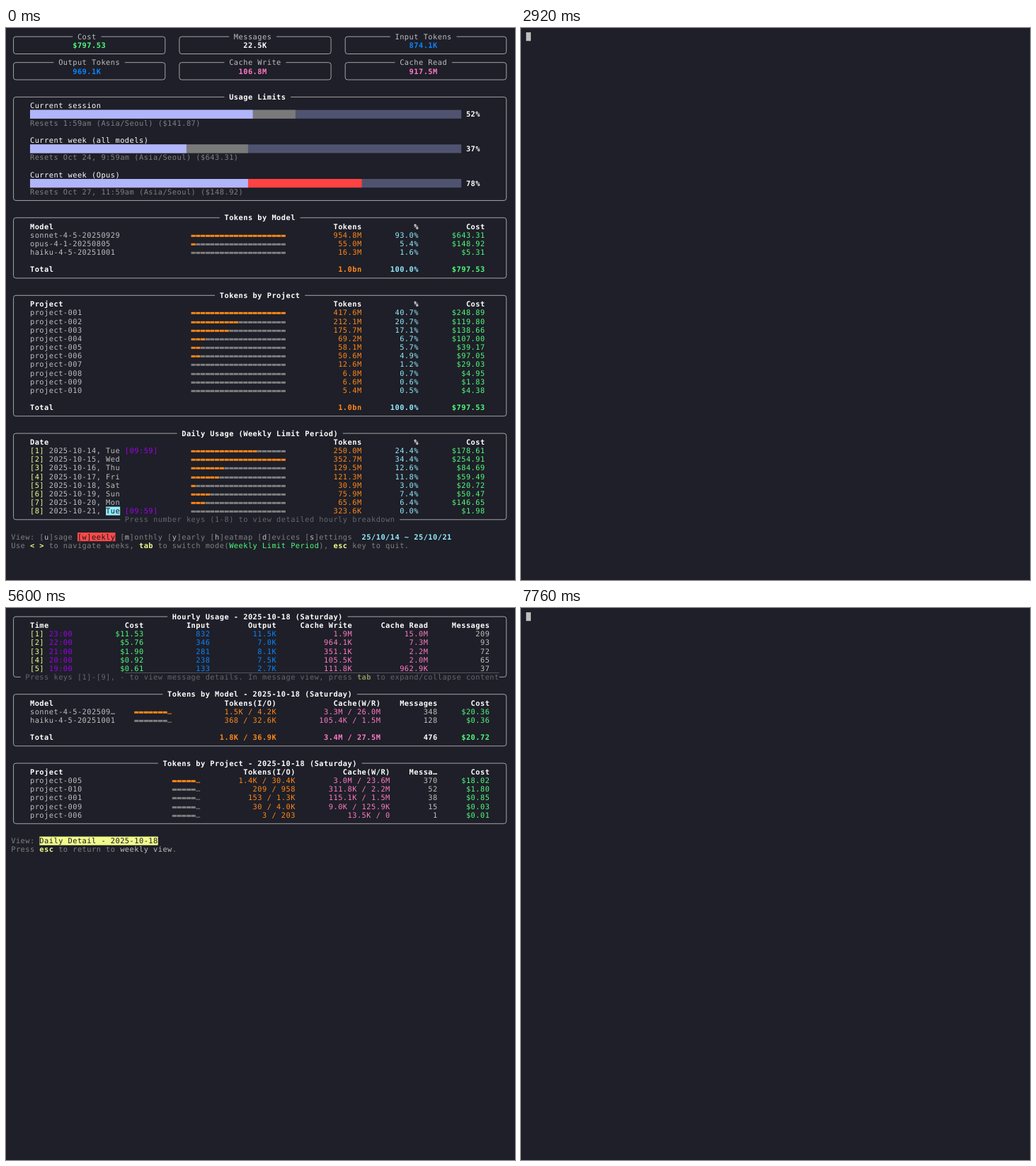
Write an HTML page that moves like this. It is 719 px wide and 779 px high and loops after 8 s.

```html
<!DOCTYPE html>
<html lang="en">
<head>
<meta charset="utf-8">
<title>Usage monitor</title>
<style>
html, body { margin: 0; width: 100%; height: 100%; overflow: hidden; background: #1e1f28; }
svg { display: block; width: 719px; height: 779px; }
text {
  font: 17px "DejaVu Sans Mono", monospace;
  letter-spacing: .765px; /* widens the glyph advance to an 11px cell */
  white-space: pre;
  text-rendering: geometricPrecision;
  fill: #bfbfbf;
}
.b { font-weight: bold; }
.white { fill: #fff; }
.grey { fill: #808080; }
.dim { fill: #66666c; }
.olive { fill: #8b915c; }
.green { fill: #50fb7c; }
.blue { fill: #0a84ff; }
.pink { fill: #ff79c6; }
.orange { fill: #ff8719; }
.cyan { fill: #93ebfe; }
.yellow { fill: #f0fb8c; }
.purple { fill: #9d00ec; }
.ink { fill: #15161c; }
.red { fill: #fc4a4a; }
.alert { fill: #ff4242; }
.used { fill: #b1b5fa; }
.pace { fill: #7a7a7a; }
.rest { fill: #505370; }
.frame { fill: none; stroke: #b2b2b4; stroke-width: 1.5; }
.trace { fill: none; stroke: #7a7a80; stroke-width: 1; }
#cursor { fill: #bfbfbf; animation: cursor 8s step-end infinite; }
#week { animation: week 8s step-end infinite; }
#detail { animation: detail 8s step-end infinite; }
@keyframes week { 0% { opacity: 1; } 36.5%, 100% { opacity: 0; } }
@keyframes detail { 0% { opacity: 0; } 37.5% { opacity: 1; } 97%, 100% { opacity: 0; } }
/* blinks under each view, jumps to the top when the screen clears */
@keyframes cursor {
  0%, 8%, 19%, 30% { opacity: 0; transform: translateY(1200px); }
  2.5%, 13.5%, 24.5%, 35.5% { opacity: 1; transform: translateY(1200px); }
  36.5%, 97%, 100% { opacity: 1; transform: translateY(0); }
  38%, 50.5%, 63.5%, 76.5%, 89.5% { opacity: 1; transform: translateY(560px); }
  44%, 57%, 70%, 83%, 96% { opacity: 0; transform: translateY(560px); }
}
</style>
</head>
<body>
<svg viewBox="0 0 719 779">
  <g transform="translate(7.2 6.09) scale(.6086)">
    <g id="week"></g>
    <g id="detail"></g>
    <rect id="cursor" width="11" height="20"/>
  </g>
</svg>
<script>
const W = 11, H = 20;
let view;

function add(tag, attrs, parent = view) {
  const el = document.createElementNS("http://www.w3.org/2000/svg", tag);
  for (const key in attrs) el.setAttribute(key, attrs[key]);
  return parent.appendChild(el);
}

// Writes [text, class] runs one after another from a grid cell.
function write(col, row, ...runs) {
  const line = add("text", { x: col * W, y: row * H + 16 });
  for (const [text, cls = ""] of runs)
    add("tspan", { class: cls }, line).textContent = text;
}

const writeEnd = (end, row, text, cls) => write(end - text.length, row, [text, cls]);

const fill = (col, row, cells, cls) =>
  add("rect", { x: col * W, y: row * H, width: cells * W, height: H, class: cls });

// Rounded frame with a centred title and an optional gap in the bottom line.
function box(left, top, right, bottom, title, cls, gap) {
  const space = title.length + 2;
  const start = left + 1 + Math.floor((right - left - 1 - space) / 2);
  const x0 = left * W + 5.5, x1 = right * W + 5.5;
  const y0 = top * H + 10, y1 = bottom * H + 10, r = 5.5;
  const low = gap ? `H${gap[1] * W}M${gap[0] * W} ${y1}` : "";
  add("path", {
    class: "frame",
    d: `M${start * W} ${y0}H${x0 + r}Q${x0} ${y0} ${x0} ${y0 + r}V${y1 - r}` +
       `M${(start + space) * W} ${y0}H${x1 - r}Q${x1} ${y0} ${x1} ${y0 + r}V${y1 - r}` +
       `Q${x1} ${y1} ${x1 - r} ${y1}${low}H${x0 + r}Q${x0} ${y1} ${x0} ${y1 - r}`
  });
  write(start + 1, top, [title, cls]);
}

// One "|" separated row of right-aligned cells.
function cells(row, ends, text, classes, bold = "") {
  text.split("|").forEach((cell, i) =>
    cell && writeEnd(ends[i], row, cell, `${classes[i]} ${bold}`));
}

function header(row, name, ends, text) {
  write(4, row, [name, "white b"]);
  cells(row, ends, text, ends.map(() => "white"), "b");
}

const meter = (row, on) =>
  write(38, row, ["▬".repeat(on), "orange"], ["▬".repeat(20 - on), "grey"]);

// Weekly view
view = document.getElementById("week");

[
  [0, 0, 32, "Cost", "$797.53", "green"],
  [35, 0, 67, "Messages", "22.5K", "white"],
  [70, 0, 104, "Input Tokens", "874.1K", "blue"],
  [0, 3, 32, "Output Tokens", "969.1K", "blue"],
  [35, 3, 67, "Cache Write", "106.8M", "pink"],
  [70, 3, 104, "Cache Read", "917.5M", "pink"]
].forEach(([left, top, right, title, value, cls]) => {
  box(left, top, right, top + 2, title);
  const pad = Math.floor((right - left - 1 - value.length) / 2);
  write(left + 1 + pad, top + 1, [value, cls + " b"]);
});

box(0, 7, 104, 19, "Usage Limits", "white b");
[
  ["Current session", "Resets 1:59am (Asia/Seoul) ($141.87)", 51, 60, "pace", "52%"],
  ["Current week (all models)", "Resets Oct 24, 9:59am (Asia/Seoul) ($643.31)", 37, 50, "pace", "37%"],
  ["Current week (Opus)", "Resets Oct 27, 11:59am (Asia/Seoul) ($148.92)", 50, 74, "alert", "78%"]
].forEach(([name, reset, a, b, cls, percent], i) => {
  const row = 8 + i * 4;
  write(4, row, [name, "white"]);
  fill(4, row + 1, 91, "rest");
  fill(4, row + 1, b - 4, cls);
  fill(4, row + 1, a - 4, "used");
  write(96, row + 1, [percent, "white b"]);
  write(4, row + 2, [reset, "grey"]);
});

const ENDS = [74, 86, 100];
const TINTS = ["orange", "cyan", "green"];
const HEADS = "Tokens|%|Cost";

function usage(row, label, on, text) {
  write(4, row, ...label);
  meter(row, on);
  cells(row, ENDS, text, TINTS);
}

function total(row) {
  write(4, row, ["Total", "white b"]);
  cells(row, ENDS, "1.0bn|100.0%|$797.53", TINTS, "b");
}

box(0, 21, 104, 28, "Tokens by Model", "white b");
header(22, "Model", ENDS, HEADS);
usage(23, [["sonnet-4-5-20250929"]], 20, "954.8M|93.0%|$643.31");
usage(24, [["opus-4-1-20250805"]], 1, "55.0M|5.4%|$148.92");
usage(25, [["haiku-4-5-20251001"]], 0, "16.3M|1.6%|$5.31");
total(27);

box(0, 30, 104, 44, "Tokens by Project", "white b");
header(31, "Project", ENDS, HEADS);
[
  [20, "417.6M|40.7%|$248.89"],
  [10, "212.1M|20.7%|$119.80"],
  [8, "175.7M|17.1%|$138.66"],
  [3, "69.2M|6.7%|$107.00"],
  [2, "58.1M|5.7%|$39.17"],
  [2, "50.6M|4.9%|$97.05"],
  [0, "12.6M|1.2%|$29.03"],
  [0, "6.8M|0.7%|$4.95"],
  [0, "6.6M|0.6%|$1.83"],
  [0, "5.4M|0.5%|$4.38"]
].forEach(([on, text], i) =>
  usage(32 + i, [["project-" + String(i + 1).padStart(3, "0")]], on, text));
total(43);

box(0, 46, 104, 56, "Daily Usage (Weekly Limit Period)", "white b", [23, 82]);
header(47, "Date", ENDS, HEADS);
fill(20, 55, 3, "cyan");
[
  ["Tue", 14, "250.0M|24.4%|$178.61"],
  ["Wed", 20, "352.7M|34.4%|$254.91"],
  ["Thu", 7, "129.5M|12.6%|$84.69"],
  ["Fri", 6, "121.3M|11.8%|$59.49"],
  ["Sat", 1, "30.9M|3.0%|$20.72"],
  ["Sun", 4, "75.9M|7.4%|$50.47"],
  ["Mon", 3, "65.6M|6.4%|$146.65"],
  ["Tue", 0, "323.6K|0.0%|$1.98"]
].forEach(([day, on, text], i) => {
  const label = [[`[${i + 1}]`, "yellow"], [` 2025-10-${14 + i}, `], [day, i === 7 ? "ink" : ""]];
  if (day === "Tue") label.push([" [09:59]", "purple"]);
  usage(48 + i, label, on, text);
});
write(24, 56, ["Press number keys (1-8) to view detailed hourly breakdown", "dim"]);

const key = (letter, rest) => [["[", "grey"], [letter], [`]${rest} `, "grey"]];
fill(14, 58, 8, "red");
write(0, 58, ["View: ", "grey"], ...key("u", "sage"), ["[w]eekly", "ink"], [" "],
  ...key("m", "onthly"), ...key("y", "early"), ...key("h", "eatmap"),
  ...key("d", "evices"), ...key("s", "ettings"), [" "],
  ["25/10/14 ~ 25/10/21", "cyan b"]);
write(0, 59, ["Use ", "grey"], ["< >", "yellow b"], [" to navigate weeks, ", "grey"],
  ["tab", "yellow b"], [" to switch mode(", "grey"], ["Weekly Limit Period", "green"],
  ["), ", "grey"], ["esc", "yellow b"], [" key to quit.", "grey"]);

// Daily detail view
view = document.getElementById("detail");
const DAY = " - 2025-10-18 (Saturday)";

box(0, 0, 104, 7, "Hourly Usage" + DAY, "white b", [2, 103]);
const hourEnds = [28, 42, 56, 72, 88, 101];
header(1, "Time", hourEnds, "Cost|Input|Output|Cache Write|Cache Read|Messages");
[
  "$11.53|832|11.5K|1.9M|15.0M|209",
  "$5.76|346|7.0K|964.1K|7.3M|93",
  "$1.90|281|8.1K|351.1K|2.2M|72",
  "$0.92|238|7.5K|105.5K|2.0M|65",
  "$0.61|133|2.7K|111.8K|962.9K|37"
].forEach((text, i) => {
  write(4, 2 + i, [`[${i + 1}]`, "yellow"], [` ${23 - i}:00`, "purple"]);
  cells(2 + i, hourEnds, text, ["green", "blue", "blue", "pink", "pink", ""]);
});
add("path", { class: "trace", d: `M${24 * W} 140.3H${103 * W}` });
write(3, 7,
  ["Press keys [1]-[9], - to view message details. In message view, press ", "dim"],
  ["tab", "olive b"], [" to expand/collapse content", "dim"]);

const dayTints = ["orange", "pink", "", "green"];

box(0, 9, 104, 15, "Tokens by Model" + DAY, "white b");
const modelEnds = [56, 78, 90, 101];
header(10, "Model", modelEnds, "Tokens(I/O)|Cache(W/R)|Messages|Cost");
[
  ["sonnet-4-5-202509…", "orange", "1.5K / 4.2K|3.3M / 26.0M|348|$20.36"],
  ["haiku-4-5-20251001", "grey", "368 / 32.6K|105.4K / 1.5M|128|$0.36"]
].forEach(([name, cls, text], i) => {
  write(4, 11 + i, [name]);
  write(26, 11 + i, ["▬".repeat(7) + "…", cls]);
  cells(11 + i, modelEnds, text, dayTints);
});
write(4, 14, ["Total", "white b"]);
cells(14, modelEnds, "1.8K / 36.9K|3.4M / 27.5M|476|$20.72", ["orange", "pink", "white", "green"], "b");

box(0, 17, 104, 24, "Tokens by Project" + DAY, "white b");
const projectEnds = [60, 80, 90, 101];
header(18, "Project", projectEnds, "Tokens(I/O)|Cache(W/R)|Messa…|Cost");
[
  ["005", "1.4K / 30.4K|3.0M / 23.6M|370|$18.02"],
  ["010", "209 / 958|311.8K / 2.2M|52|$1.80"],
  ["001", "153 / 1.3K|115.1K / 1.5M|38|$0.85"],
  ["009", "30 / 4.0K|9.0K / 125.9K|15|$0.03"],
  ["006", "3 / 203|13.5K / 0|1|$0.01"]
].forEach(([id, text], i) => {
  write(4, 19 + i, ["project-" + id]);
  write(34, 19 + i, ["▬".repeat(5) + "…", i ? "grey" : "orange"]);
  cells(19 + i, projectEnds, text, dayTints);
});

fill(6, 26, 25, "yellow");
write(0, 26, ["View: ", "grey"], ["Daily Detail" + DAY.slice(0, 13), "ink"]);
write(0, 27, ["Press ", "grey"], ["esc", "yellow b"], [" to return to ", "grey"],
  ["weekly view"], [".", "grey"]);
</script>
</body>
</html>
```
